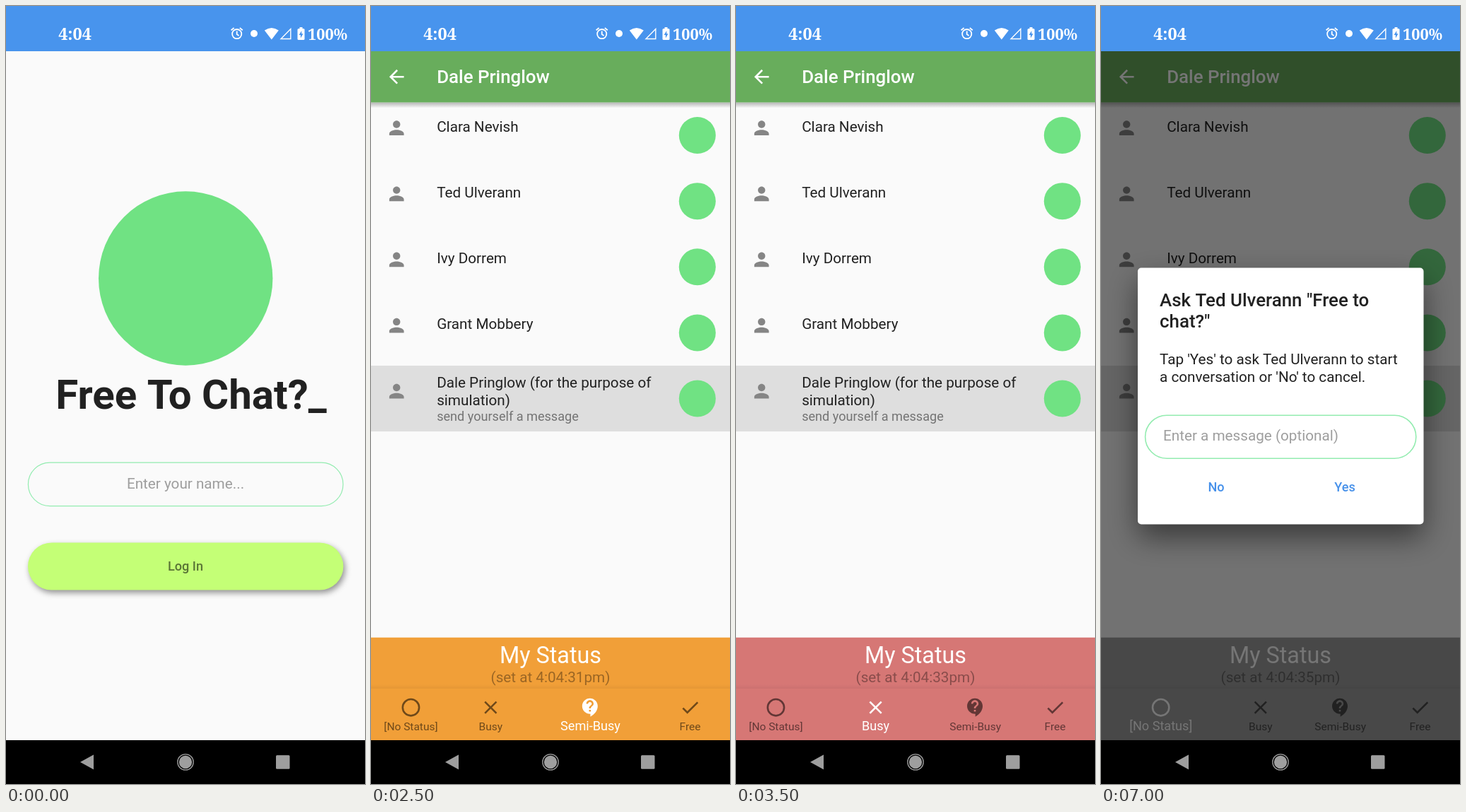
Recreate the animation shown at these times as an HTML page with a canvas. Size 508 by 1101 pixels, loop 8 s.

```html
<!DOCTYPE html>
<html lang="en">
<head>
<meta charset="utf-8">
<title>Availability app</title>
<style>
html, body { margin: 0; width: 100%; height: 100%; overflow: hidden; background: #fafafa; }
canvas { display: block; width: 508px; height: 1101px; }
</style>
</head>
<body>
<canvas id="stage"></canvas>
<script>
const W = 508, H = 1101, LOOP = 8000;
const DP = W / 392.73;         // pixels per layout unit
const TILE = 72 * DP, LIST_TOP = 64 + 56 * DP;
const APP = 'Free To Chat?';
const ME = 'Dale Pringlow';
const PEOPLE = ['Clara Nevish', 'Ted Ulverann', 'Ivy Dorrem', 'Grant Mobbery'];
const INK = '#212121', BADGE = '#70e283', DIM = 'rgba(0,0,0,.54)';

const ICONS = {
  person: 'M12 12c2.21 0 4-1.79 4-4s-1.79-4-4-4-4 1.79-4 4 1.79 4 4 4zm0 2c-2.67 0-8 1.34-8 4v2h16v-2c0-2.66-5.33-4-8-4z',
  back: 'M20 11H7.83l5.59-5.59L12 4l-8 8 8 8 1.41-1.41L7.83 13H20z',
  ring: 'M12 2a10 10 0 1 0 0 20a10 10 0 1 0 0-20zm0 18a8 8 0 1 1 0-16a8 8 0 1 1 0 16z',
  close: 'M19 6.41L17.59 5 12 10.59 6.41 5 5 6.41 10.59 12 5 17.59 6.41 19 12 13.41 17.59 19 19 17.59 13.41 12z',
  ask: 'M11.5 2C6.81 2 3 5.81 3 10.5S6.81 19 11.5 19h.5v3c4.86-2.34 8-7 8-11.5C20 5.81 16.19 2 11.5 2zm1 14.5h-2v-2h2v2zm0-3.5h-2c0-3.25 3-3 3-5 0-1.1-.9-2-2-2s-2 .9-2 2h-2c0-2.21 1.79-4 4-4s4 1.79 4 4c0 2.5-3 2.75-3 5z',
  check: 'M9 16.17L4.83 12l-1.42 1.41L9 19 21 7l-1.41-1.41z'
};
for (const k in ICONS) ICONS[k] = new Path2D(ICONS[k]);

const TABS = [['ring', '[No Status]'], ['close', 'Busy'], ['ask', 'Semi-Busy'], ['check', 'Free']];
const STATES = [
  { from: 1500, tab: 3, color: '#68ad5c', time: '4:04:12pm' },
  { from: 2500, tab: 2, color: '#f19f38', time: '4:04:31pm' },
  { from: 3500, tab: 1, color: '#d67775', time: '4:04:33pm' },
  { from: 4500, tab: 0, color: '#9e9e9e', time: '4:04:35pm' }
];
const DIALOG_AT = 5500;

const cv = document.getElementById('stage'), c = cv.getContext('2d');
const ratio = window.devicePixelRatio || 1;
cv.width = W * ratio;
cv.height = H * ratio;

function rect(x, y, w, h, fill) {
  c.fillStyle = fill;
  c.fillRect(x, y, w, h);
}

function disc(x, y, r, fill) {
  c.fillStyle = fill;
  c.beginPath();
  c.arc(x, y, r, 0, Math.PI * 2);
  c.fill();
}

function poly(fill, ...p) {
  c.beginPath();
  for (let i = 0; i < p.length; i += 2) c.lineTo(p[i], p[i + 1]);
  c.closePath();
  c.fillStyle = fill;
  c.fill();
}

function pill(x, y, w, h, r) {
  c.beginPath();
  c.roundRect(x, y, w, h, r);
}

function outline(x, y, w, h, width) {
  pill(x, y, w, h, h / 2);
  c.strokeStyle = '#93ecb0';
  c.lineWidth = width;
  c.stroke();
}

function shadowed(fill, dx, dy, blur, alpha) {
  c.save();
  c.shadowColor = `rgba(0,0,0,${alpha})`;
  c.shadowOffsetX = dx * ratio;
  c.shadowOffsetY = dy * ratio;
  c.shadowBlur = blur * ratio;
  c.fillStyle = fill;
  c.fill();
  c.restore();
}

function text(s, x, y, size, color, align = 'left', weight = 400, family = 'Roboto, sans-serif') {
  c.font = `${weight} ${size}px ${family}`;
  c.textAlign = align;
  c.fillStyle = color;
  c.fillText(s, x, y);
}

function icon(name, x, y, color) {
  c.save();
  c.translate(x, y);
  c.scale(DP, DP);
  c.translate(-12, -12);
  c.fillStyle = color;
  c.fill(ICONS[name], 'evenodd');
  c.restore();
}

function fade(y, h, top, bottom) {
  const g = c.createLinearGradient(0, y, 0, y + h);
  g.addColorStop(0, `rgba(0,0,0,${top})`);
  g.addColorStop(1, `rgba(0,0,0,${bottom})`);
  rect(0, y, W, h, g);
}

function line(...p) {
  c.beginPath();
  for (let i = 0; i < p.length; i += 2) c.lineTo(p[i], p[i + 1]);
  c.stroke();
}

function statusBar() {
  const blue = '#4894ed', white = '#fff';
  rect(0, 0, W, 64, blue);
  const serif = '"Noto Serif", serif';
  text('4:04', 97.5, 47.7, 23.6, white, 'center', 800, serif);
  text('100%', 455.2, 47.7, 21.8, white, 'center', 800, serif);

  // alarm clock
  c.strokeStyle = white;
  c.lineWidth = 1.8;
  c.beginPath();
  c.arc(326.7, 39.6, 6.6, 0, Math.PI * 2);
  c.stroke();
  line(326.7, 35.5, 326.7, 40, 329.6, 42);
  line(318.6, 34.2, 322.6, 31);
  line(330.8, 31, 334.8, 34.2);

  disc(351, 39, 5, white);

  // wifi, signal
  c.fillStyle = white;
  c.beginPath();
  c.moveTo(375.8, 47.5);
  c.lineTo(365.8, 34.5);
  c.quadraticCurveTo(375.8, 27.5, 385.8, 34.5);
  c.fill();
  c.lineWidth = 1.4;
  c.beginPath();
  c.moveTo(389, 46.5);
  c.lineTo(402.8, 46.5);
  c.lineTo(402.8, 32.5);
  c.closePath();
  c.stroke();

  // battery with bolt
  pill(412.5, 32, 10, 16, 1.5);
  c.fillStyle = white;
  c.fill();
  rect(415.5, 30, 4, 3, white);
  poly(blue, 418.3, 35, 414.6, 41, 416.9, 41, 416.9, 45.5, 420.5, 39.3, 418.3, 39.3);
}

function systemBar() {
  const grey = '#9e9e9e';
  rect(0, 1039, W, H - 1039, '#000');
  poly(grey, 105, 1070, 124, 1059.5, 124, 1080.5);
  disc(254, 1070, 9.2, grey);
  c.strokeStyle = grey;
  c.lineWidth = 1.3;
  c.beginPath();
  c.arc(254, 1070, 11.2, 0, Math.PI * 2);
  c.stroke();
  pill(382, 1060.3, 19.5, 19.5, 1.5);
  c.fillStyle = grey;
  c.fill();
}

function login() {
  disc(254.2, 385.5, 123.2, BADGE);
  text(APP + '_', 262, 569.5, 45 * DP, INK, 'center', 700);
  outline(31.4, 646.2, 445.6, 61.4, 1.2);
  text('Enter your name...', 254, 683, 16 * DP, '#9e9e9e', 'center');
  pill(31, 759.5, 446.4, 67, 33.5);
  shadowed('#c4ff76', 2.5, 4, 8, .42);
  text('Log In', 254, 799, 14 * DP, DIM, 'center', 500);
}

function contacts() {
  const left = 72 * DP, size = 16 * DP;
  rect(0, LIST_TOP + 4 * TILE, W, TILE, '#dedede');
  for (let i = 0; i < 5; i++) {
    const y = LIST_TOP + i * TILE;
    icon('person', 28 * DP, y + 28 * DP, '#858585');
    disc(461.8, y + TILE / 2, 26, BADGE);
    if (i < 4) text(PEOPLE[i], left, y + 41.6, size, INK);
  }
  text(ME + ' (for the purpose of', left, 540.3, size, INK);
  text('simulation)', left, 564.7, size, INK);
  text('send yourself a message', left, 586.8, 14 * DP, '#747474');

  fade(LIST_TOP, 8, .28, 0);
  rect(0, 64, W, LIST_TOP - 64, '#68ad5c');
  icon('back', 28 * DP, 100.2, '#fff');
  text(ME, left, 108.5, 20 * DP, '#fff', 'left', 500);
}

function statusPanel(s) {
  rect(0, 893.7, W, 145.3, s.color);
  fade(960, 6, 0, .05);
  text('My Status', 254, 930, 25 * DP, '#fff', 'center');
  text(`(set at ${s.time})`, 254, 957.3, 16 * DP, 'rgba(0,0,0,.36)', 'center');

  const unit = W / 4.5;
  let x = 0;
  TABS.forEach(([name, label], i) => {
    const on = i === s.tab, w = on ? unit * 1.5 : unit;
    const color = on ? '#fff' : DIM;
    icon(name, x + w / 2, 992.7, color);
    text(label, x + w / 2, on ? 1024.6 : 1025.4, (on ? 14 : 12) * DP, color, 'center');
    x += w;
  });
}

function dialog() {
  const who = PEOPLE[1], body = 16 * DP, link = '#4791ea';
  rect(0, 64, W, 975, 'rgba(0,0,0,.54)');
  pill(52, 370.5, 404.5, 363, 5);
  shadowed('#fff', 0, 18, 42, .5);
  text(`Ask ${who} "${APP.slice(0, 5)}to`, 83, 424.8, 20 * DP, INK, 'left', 500);
  text('chat?"', 83, 455, 20 * DP, INK, 'left', 500);
  text(`Tap 'Yes' to ask ${who} to start`, 83, 507.3, body, INK);
  text("a conversation or 'No' to cancel.", 83, 531.7, body, INK);
  outline(62.6, 579.2, 383.2, 61, 1.6);
  text('Enter a message (optional)', 88, 615, body, '#9e9e9e');
  text('No', 163, 687.3, 14 * DP, link, 'center', 500);
  text('Yes', 345, 687.3, 14 * DP, link, 'center', 500);
}

function draw(t) {
  c.setTransform(ratio, 0, 0, ratio, 0, 0);
  rect(0, 0, W, H, '#fafafa');
  const state = STATES.filter(s => t >= s.from).pop();
  if (state) {
    contacts();
    statusPanel(state);
    if (t >= DIALOG_AT) dialog();
  } else {
    login();
  }
  statusBar();
  systemBar();
}

const start = performance.now();
function tick() {
  draw((performance.now() - start) % LOOP);
  requestAnimationFrame(tick);
}
tick();
</script>
</body>
</html>
```
